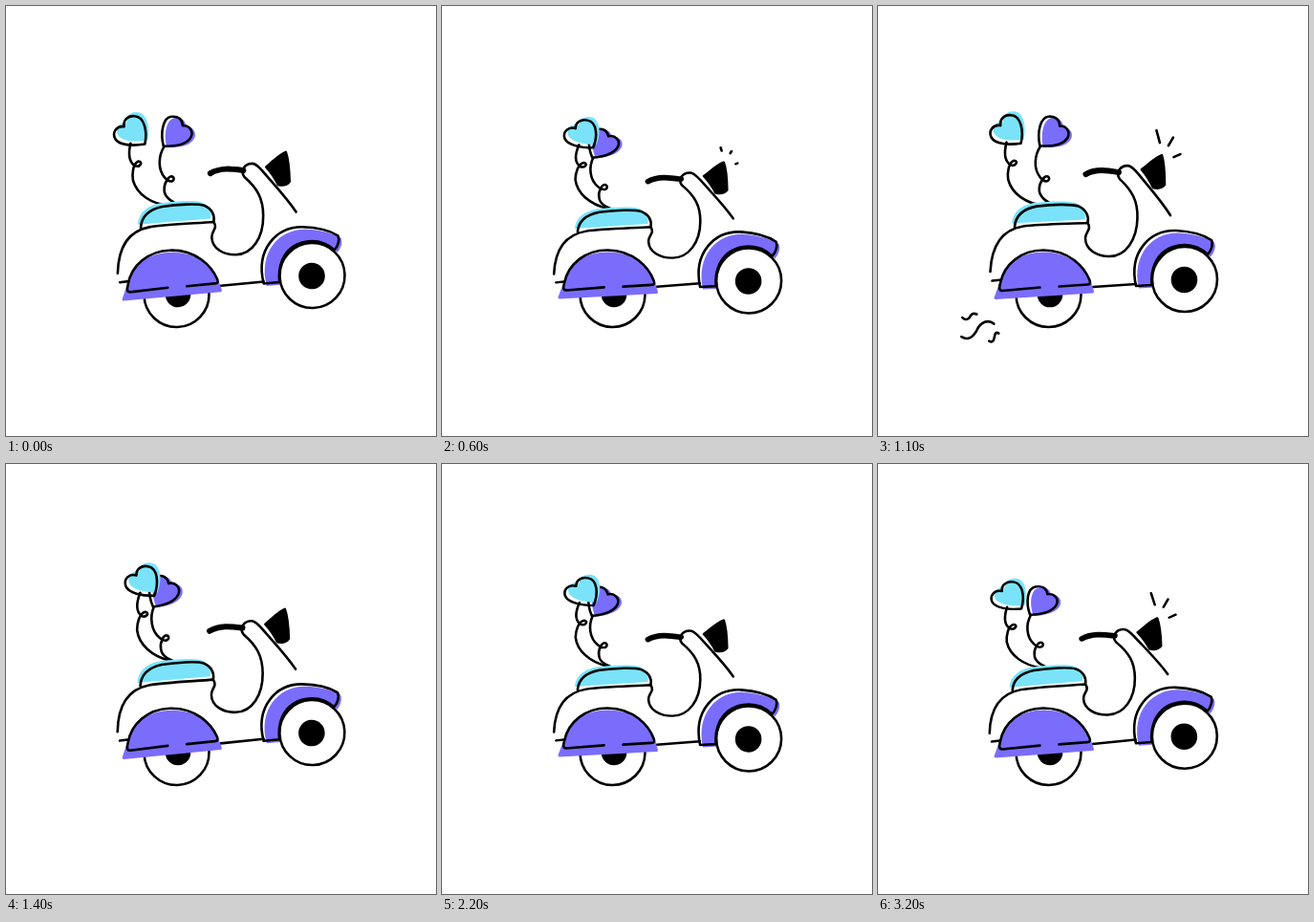
These frames come from a looping animation (450x450 px, 3300 ms). An HTML page:

```html
<!DOCTYPE html>
<html lang="en">
<head>
<meta charset="utf-8">
<title>Scooter</title>
<style>
  html, body { margin: 0; width: 100%; height: 100%; overflow: hidden; background: #fff; }
  svg { display: block; width: 100vw; height: 100vh; }
  .line { fill: none; stroke: #000; stroke-width: 2.6; stroke-linecap: round; stroke-linejoin: round; }
  .cyan { fill: #7ae3fa; }
  .violet { fill: #7a6dfc; }
  .soft { stroke: #7a6dfc; stroke-width: 3; stroke-linejoin: round; }
  .white { fill: #fff; }
</style>
</head>
<body>
<svg viewBox="0 0 450 450">
  <defs>
    <path id="heartL" d="M149 144C152 131 149 115 138.500 114.500C131 114 126.500 119 127.500 125.500C120 124 114.500 131 118 138C122 145 136 146 149 144Z"/>
    <path id="heartR" d="M170 146C167 131 171 116 179.500 115.500C187 115 191 119 191 125.500C198 125 202.500 132 199 138C194 146 182 147 170 146Z"/>
    <path id="seat" d="M143 231C144 219 153 212 166 209.500C182 207.500 203 207 210 209.500C218 213 221 220 219.500 227Z"/>
    <path id="mudguard" d="M270 293C262 257 285 234 312 235C330 236 343 241 349 245C351 249 349 256 345 260C328 244 300 248 290 269C286 278 286 286 286.500 292Z"/>
  </defs>

  <g id="puffs" class="line">
    <path pathLength="1" d="M122 332C116 327 108 330 104 339C100 346 95 350 88 345.500"/>
    <path pathLength="1" d="M104 322C99 320 98 323 96 326C94 328 91 328 89 325.500"/>
    <path pathLength="1" d="M127 342C124 340 123 343 122.500 346C122 350 120 352 117 350"/>
  </g>

  <g id="bike">
    <g class="line">
      <circle class="white" cx="178.500" cy="302" r="34"/>
      <circle cx="180" cy="302" r="12" style="fill:#000"/>
    </g>
    <g id="body">
      <g id="balloonR">
        <use href="#heartR" class="violet" x="3.500" y="1.500"/>
        <path class="line" d="M171 146C164 156 163 170 170 179C175 186 181 183 179 179C175 175 169 185 169 191C168 199 177 206 186 209"/>
        <use href="#heartR" class="line"/>
      </g>
      <g id="balloonL">
        <use href="#heartL" class="cyan" x="3" y="-4"/>
        <path class="line" d="M134 143C131 155 133 163 138 166.500C144 169 147 162 142 162C136 164 135 175 136 182C140 197 155 207 174 209L184 211"/>
        <use href="#heartL" class="line"/>
      </g>

      <use href="#seat" class="cyan" x="-3" y="-3.500"/>
      <g class="line">
        <path d="M143 231C144 219 153 212 166 209.500C182 207.500 203 207 210 209.500C218 213 221 220 219.500 227"/>
        <path d="M117.500 278C119 250 130 234 152 230.500C170 228 200 228 219.500 227C224 234 217 236 217 243C217 255 229 262 242 262C259 262 271 245 271.500 222C272 204 266 193 253 181C248 174 254 167 261 167C266 167 268 171 272 175C284 190 296 203 306 219"/>
        <path d="M119.500 287.500L130 286.500M225 294L270 291"/>
        <path d="M217.500 176C228 170 240 172 252 174" style="stroke-width:6"/>
        <path d="M276 171C283 166 289 159 297 156C300 165 300 176 300 187C297 191 292 191 288 190C285 183 281 177 276 171Z" style="fill:#000"/>
      </g>

      <g id="rays" class="line">
        <path pathLength="1" d="M295 143L291.500 130"/>
        <path pathLength="1" d="M304 146L309 137.500"/>
        <path pathLength="1" d="M309.500 158L316.500 155"/>
      </g>
    </g>

    <path class="violet soft" d="M123 305.500L129 289C134 270 151 259 174 259C200 259 219 275 224.500 299Z"/>
    <path class="line" d="M169.500 294.500L130 298C126 298 127 294 128 290C132 270 150 255.500 173 255.500C200 255.500 216 273 221.500 287C222.500 290 222 291.500 219 291.500L189.500 293.500"/>

    <use href="#mudguard" class="violet" x="3" y="2.500"/>
    <use href="#mudguard" class="line"/>
    <g class="line">
      <circle class="white" cx="321" cy="286" r="34"/>
      <circle cx="320.500" cy="286.500" r="12.500" style="fill:#000"/>
    </g>
  </g>
</svg>
<script>
const LOOP = 3300, STEP = 100;
const AXLE = [179, 302], KNOT_L = [195, 210], KNOT_R = [180, 210];
// Slow rocking of the whole bike: [time, degrees].
const TILT = [[0, -1.6], [5.8, 0.6], [11, 0], [14, -2], [15.5, -0.5], [16.5, -1.6]];

const el = id => document.getElementById(id);
const clamp = x => Math.min(1, Math.max(0, x));
const smooth = x => { x = clamp(x); return x * x * (3 - 2 * x); };
const ramp = (a, b, t) => smooth((t - a) / (b - a));
const wave = (t, period, peak) => Math.cos(2 * Math.PI * (t - peak) / period);
const set = (id, transform) => el(id).setAttribute("transform", transform);

function keyed(keys, t) {
  const i = keys.findIndex(([time]) => time > t);
  const [t0, v0] = keys[i - 1], [t1, v1] = keys[i];
  return v0 + (v1 - v0) * ramp(t0, t1, t);
}

// Shows only the part of each path between two fractions of its length.
function trim(id, from, to) {
  const length = to - from;
  el(id).style.display = length > 0.01 ? "" : "none";
  for (const path of el(id).children) {
    path.setAttribute("stroke-dasharray", `${length} 3`);
    path.setAttribute("stroke-dashoffset", -from);
  }
}

// t counts tenths of a second.
function draw(t) {
  // The body sinks on its springs and leans back a little as it does.
  const sink = 1 - smooth(0.5 + 0.85 * wave(t, 3.3, 0.55));
  const stretch = 1 - 0.065 * sink;
  const sway = (0.6 - wave(t, 8.25, 1.4)) * 6.2;

  set("bike", `rotate(${keyed(TILT, t % 16.5)} ${AXLE})`);
  set("body", `rotate(${-1.5 * sink} ${AXLE}) translate(0 ${AXLE[1] * (1 - stretch)}) scale(1 ${stretch})`);
  set("balloonL", `rotate(${sway} ${KNOT_L})`);
  set("balloonR", `rotate(${-sway} ${KNOT_R})`);

  const flash = t % 4.125;
  trim("rays", ramp(3.15, 3.95, flash), ramp(1.65, 2.3, flash));
  set("rays", `translate(0 ${-3 * ramp(2.75, 3.3, flash)})`);

  const puff = t % 8.25;
  const drift = ramp(2.5, 4.6, puff);
  trim("puffs", ramp(3.9, 5.2, puff), ramp(0.6, 2.1, puff));
  set("puffs", `translate(${-18 * drift} ${14 * drift})`);
}

const start = performance.now();
function tick() {
  const ms = (performance.now() - start) % LOOP;
  draw(Math.floor(ms / STEP));
  requestAnimationFrame(tick);
}
tick();
</script>
</body>
</html>
```
